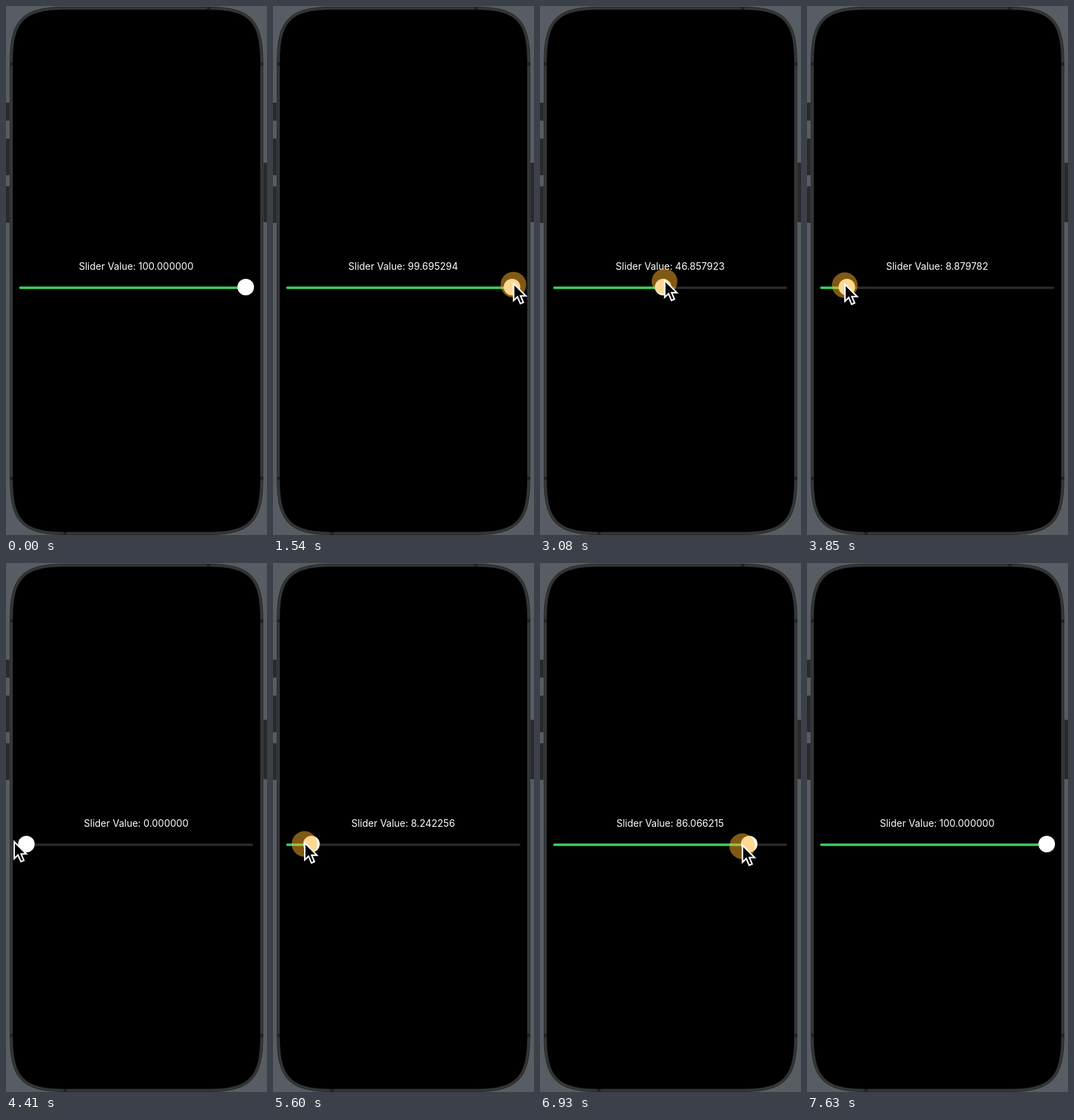
Recreate the animation shown at these times as an HTML page. Size 378 by 766 pixels, loop 8 s.

```html
<!DOCTYPE html>
<html lang="en">
<head>
<meta charset="utf-8">
<title>Slider</title>
<style>
  html, body { margin: 0; width: 100%; height: 100%; overflow: hidden; background: #575d63; }
  svg { display: block; width: 100vw; height: 100vh; }
  text { font: 400 14px Inter, "Liberation Sans", sans-serif; fill: #fff; text-anchor: middle; }
</style>
</head>
<body>
<svg viewBox="0 0 378 766">
  <rect width="378" height="766" fill="#575d63"/>
  <path d="M0 140h5v26h-5zM0 192h5v53h-5zM0 261h5v53h-5zM373 227h5v86h-5z" fill="#292a2b"/>

  <path id="body" fill="#303132" stroke="#232425"/>
  <path id="rim" fill="none" stroke="#3c3e3f"/>
  <path d="M6 84h362M6 684h362M293.5 1v5M85.5 761v5" transform="translate(0 0)" stroke="#1f2021" stroke-width="4.5" stroke-dasharray="4.5 357.5"/>
  <path d="M368 84h4.5M368 684h4.5" stroke="#1f2021" stroke-width="4.5"/>
  <path id="screen"/>

  <text id="label" x="188.5" y="382"></text>
  <rect x="19" y="406.2" width="339" height="3.6" rx="1.8" fill="#2b2b2d"/>
  <rect id="fill" x="19" y="406.2" height="3.6" rx="1.8" fill="#38d15d"/>
  <circle id="thumb" cy="407" r="12" fill="#fff"/>

  <g id="pointer">
    <circle id="press" r="18.6" fill="rgb(255,178,40)"/>
    <path d="M.3-1.5v24.5l5.5-5.3 4.2 9.8 4.3-1.8-4-9.4h7.6z" fill="#000" stroke="#fff" stroke-width="2.1" stroke-miterlimit="8"/>
  </g>
</svg>
<script>
const LOOP = 8000, STEP = 70;
const $ = id => document.getElementById(id);
const clamp = (v, lo = 0, hi = 1) => Math.min(hi, Math.max(lo, v));

// Phone outline with continuous corners, moved inwards by d
function outline(d) {
  const l = 6 + d, t = 1.5 + d, r = 372 - d, b = 765.5 - d;
  const e = 80 - d, c = 18 - d / 2;
  return `M${l} ${t + e}C${l} ${t + c} ${l + c} ${t} ${l + e} ${t}
    H${r - e}C${r - c} ${t} ${r} ${t + c} ${r} ${t + e}
    V${b - e}C${r} ${b - c} ${r - c} ${b} ${r - e} ${b}
    H${l + e}C${l + c} ${b} ${l} ${b - c} ${l} ${b - e}Z`;
}
$("body").setAttribute("d", outline(0));
$("rim").setAttribute("d", outline(1.5));
$("screen").setAttribute("d", outline(4));

// Dragged value at a few moments; it runs past both ends of the slider
const DRAG = [[420, 108], [700, 100], [1470, 100], [2310, 75.637519],
  [3080, 46.857923], [3850, 8.879782], [4270, -2.5], [5250, -2.5],
  [5600, 8.242256], [6230, 39.116573], [7630, 115]];

const slope = i => (DRAG[i + 1][1] - DRAG[i][1]) / (DRAG[i + 1][0] - DRAG[i][0]);

function tangent(i) {
  if (i === 0 || i === DRAG.length - 1) return 0;
  const a = slope(i - 1), b = slope(i);
  return a * b <= 0 ? 0 : 2 * a * b / (a + b);
}

// Monotone cubic through the moments
function dragged(time) {
  const last = DRAG.length - 1, t = clamp(time, DRAG[0][0], DRAG[last][0]);
  let i = 0;
  while (i < last - 1 && t >= DRAG[i + 1][0]) i++;
  const [[t0, a], [t1, b]] = [DRAG[i], DRAG[i + 1]];
  const h = t1 - t0, u = (t - t0) / h;
  return a + (b - a) * u * u * (3 - 2 * u)
    + h * u * (1 - u) * ((1 - u) * tangent(i) - u * tangent(i + 1));
}

const xOf = value => 29.5 + 3.177 * value;

// The pointer dips on the way left and sinks on the way back
function pointerY(t, value) {
  if (t > 4410) return 405 + 6 * Math.sqrt(clamp((value + 2.5) / 117.5));
  const p = clamp((100 - value) / 102.5);
  return 403.5 + 1.5 * p - 6.5 * Math.sin(Math.PI * p ** 0.7) ** 2;
}

function pressure(t) {
  if (t < 4410) return clamp((t - 980) / 210);
  return t < 5110 ? 0 : 1;
}

function draw(time) {
  const t = Math.floor(time % LOOP / STEP) * STEP;
  const raw = dragged(t), value = clamp(raw, 0, 100), x = xOf(value);
  $("label").textContent = "Slider Value: " + value.toFixed(6);
  $("fill").setAttribute("width", x - 19);
  $("thumb").setAttribute("cx", x);

  const grip = 2 - 12 * clamp((t - 3080) / 1190) ** 2;
  $("pointer").setAttribute("transform", `translate(${xOf(raw) + grip} ${pointerY(t, raw)})`);
  $("pointer").setAttribute("visibility", t > 420 && t < 7630 ? "visible" : "hidden");
  $("press").setAttribute("fill-opacity", pressure(t) / 2);
}

const start = performance.now();
function tick() {
  draw(performance.now() - start);
  requestAnimationFrame(tick);
}
tick();
</script>
</body>
</html>
```
